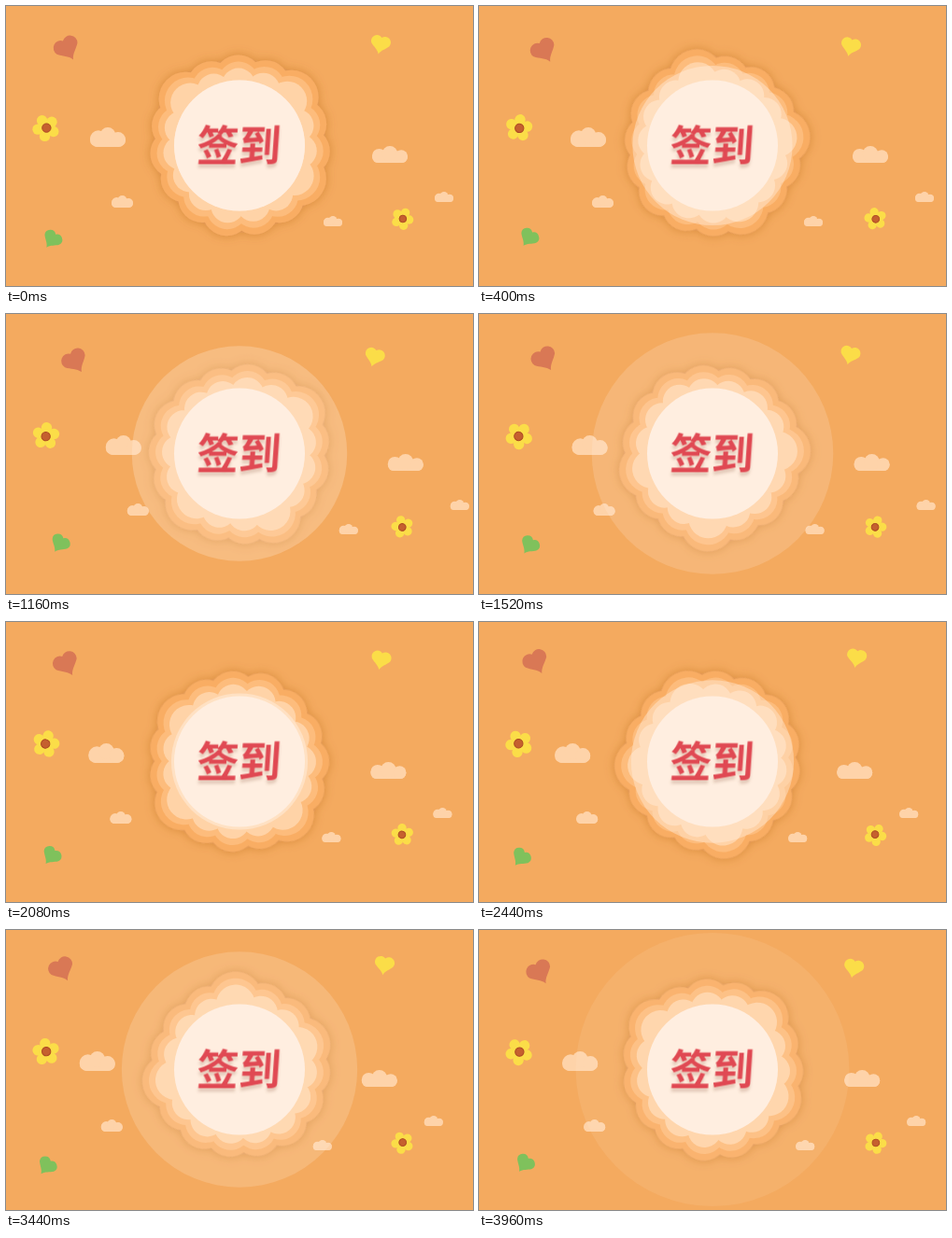
An HTML page for the animation above (4 s loop, 500 by 300 pixels).

```html
<!DOCTYPE html>
<html lang="zh-CN">
<head>
<meta charset="utf-8">
<title>签到</title>
<style>
html, body { margin: 0; width: 100%; height: 100%; overflow: hidden; background: #f4aa5f; }
svg { display: block; width: 100%; height: 100%; }
text { font: 700 45px "Noto Sans CJK SC", "Noto Sans CJK", sans-serif; }
</style>
</head>
<body>
<svg viewBox="0 0 500 300">
  <defs>
    <filter id="soft" x="-20%" y="-20%" width="140%" height="140%">
      <feDropShadow dx="0" dy="0" stdDeviation="5.5" flood-color="#a85a1c" flood-opacity=".4"/>
    </filter>
    <filter id="drop" x="-10%" y="-10%" width="120%" height="140%">
      <feDropShadow dx="0" dy="4" stdDeviation="1.8" flood-color="#8a5a40" flood-opacity=".24"/>
    </filter>
  </defs>
  <rect width="500" height="300" fill="#f4aa5f"/>
  <g id="clouds" fill="#fed3a9"></g>
  <g id="bits"></g>
  <g id="badge"></g>
  <circle id="pulse" cx="250" cy="149.5" fill="#ffeee0"/>
  <circle cx="250" cy="149.5" r="70" fill="#ffeee0"/>
  <text x="-45.5" y="17" transform="translate(250 149.5) skewX(-4)" fill="#e04a52" filter="url(#drop)">签到</text>
</svg>
<script>
const LOOP = 4000, STEP = 40, PULSE = 2000;
const $ = id => document.getElementById(id);

function add(parent, tag, attrs) {
  const el = document.createElementNS('http://www.w3.org/2000/svg', tag);
  for (const k in attrs) el.setAttribute(k, attrs[k]);
  return parent.appendChild(el);
}

function cloud(x, y, w, h) {
  const g = add($('clouds'), 'g', {});
  const base = h * 0.7, left = h * 0.42, top = w * 0.22, right = h * 0.38;
  add(g, 'rect', { x, y: y + h - base, width: w, height: base, rx: base / 2 });
  add(g, 'circle', { cx: x + left, cy: y + h - left, r: left });
  add(g, 'circle', { cx: x + w * 0.5, cy: y + top, r: top });
  add(g, 'circle', { cx: x + w - right, cy: y + h - right, r: right });
}
[[90, 130, 38, 21], [392, 150, 38, 18], [113, 203, 23, 13], [340, 225, 20, 11], [459, 199, 20, 11]]
  .forEach(c => cloud(...c));

// Scalloped badge: evenly spaced bumps, each with its own reach, in three nested layers
const reach = [97, 97, 105, 97, 97, 102, 97, 97, 98, 95, 94, 96, 97, 105, 97];
function scallop(inset, r, attrs) {
  const g = add($('badge'), 'g', attrs);
  add(g, 'circle', { r: 84 - inset });
  reach.forEach((far, i) => {
    const a = (i * 360 / reach.length - 91) * Math.PI / 180;
    const size = far > 100 ? r + 3 : r, d = far - inset - size;
    add(g, 'circle', { cx: d * Math.cos(a), cy: d * Math.sin(a), r: size });
  });
}
scallop(0, 26, { fill: '#f9ad64', filter: 'url(#soft)' });
scallop(7, 22, { fill: '#fdbc7c' });
scallop(14, 18, { fill: '#ffd3a7' });

const HEART = 'M0 12C-2 7-7 5-10.5.8A6.6 6.6 0 0 1 0-7A6.6 6.6 0 0 1 10.5.8C7 5 2 7 0 12Z';
const hearts = [
  { x: 65, y: 44.8, dx: 10, dy: 6, rot: -29, sway: -3, size: 1.2, fill: '#d97855' },
  { x: 401, y: 40.4, dx: -7.5, dy: 6, rot: 12, sway: 5, size: 0.94, fill: '#fbdd48' },
  { x: 49.6, y: 249.8, dx: 10, dy: -5, rot: 35, sway: -3, size: 0.9, fill: '#7fc15c' }
];
for (const h of hearts) h.el = add($('bits'), 'path', { d: HEART, fill: h.fill });

const flowers = [
  { x: 42.8, y: 130.6, r: 14.6, phase: 98 },
  { x: 424.4, y: 228, r: 12, phase: 80 }
];
for (const f of flowers) {
  f.el = add($('bits'), 'g', {});
  const petals = add(f.el, 'g', { fill: '#fbdd48' });
  add(petals, 'circle', { r: f.r * 0.6 });
  for (let i = 0; i < 5; i++) {
    const a = (f.phase + i * 72) * Math.PI / 180;
    add(petals, 'circle', { cx: f.r * 0.61 * Math.cos(a), cy: f.r * 0.61 * Math.sin(a), r: f.r * 0.39 });
  }
  add(f.el, 'circle', { cx: f.r * 0.04, r: f.r * 0.32, fill: '#c5602f', stroke: '#ad4a24' });
}

// Triangle wave: 0, 1, 0, -1, 0
const tri = p => p < 0.25 ? 4 * p : p < 0.75 ? 2 - 4 * p : 4 * p - 4;
const place = (el, value) => el.setAttribute('transform', value);

function draw(t) {
  const p = t / LOOP, w = tri(p), turn = p * 360, q = (t % PULSE) / PULSE;
  place($('clouds'), `translate(${20 * w})`);
  for (const h of hearts)
    place(h.el, `translate(${h.x + h.dx * w} ${h.y + h.dy * w}) rotate(${h.rot + h.sway * w}) scale(${h.size})`);
  for (const f of flowers) place(f.el, `translate(${f.x} ${f.y}) rotate(${turn})`);
  place($('badge'), `translate(250 149.5) rotate(${turn})`);
  $('pulse').setAttribute('r', 70 + 78 * q);
  $('pulse').setAttribute('opacity', 0.5 - 0.42 * q);
}

const start = performance.now();
function tick() {
  const t = Math.max(0, performance.now() - start) % LOOP;
  draw(Math.floor(t / STEP) * STEP);
  requestAnimationFrame(tick);
}
tick();
</script>
</body>
</html>
```
